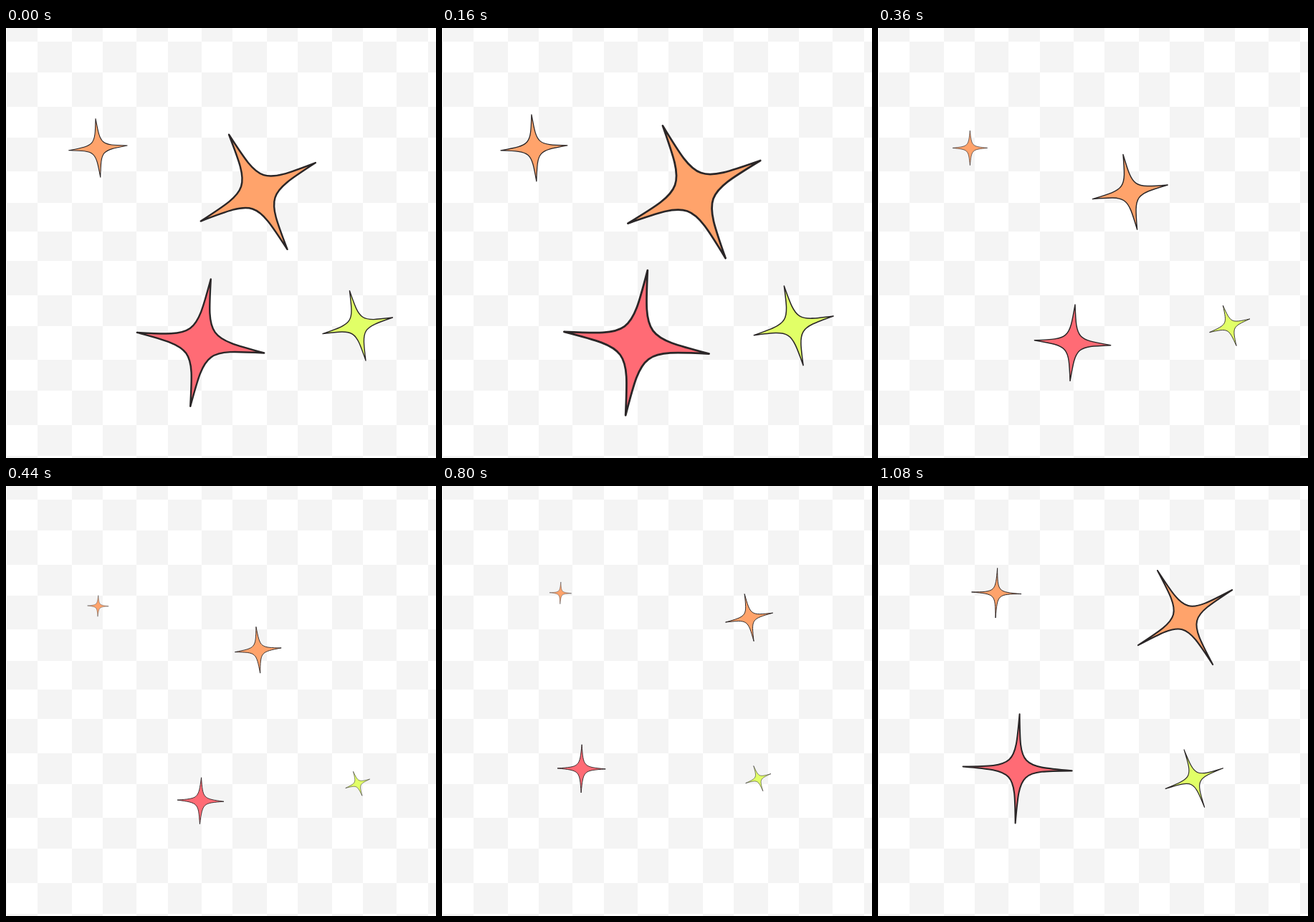
An HTML page with a canvas that plays this animation: 600x600 px, repeating every 1120 ms.

```html
<!DOCTYPE html>
<html lang="en">
<head>
<meta charset="utf-8">
<title>Twinkling stars</title>
<style>
html, body { margin: 0; width: 100%; height: 100%; overflow: hidden; background: #fff; }
canvas { display: block; }
</style>
</head>
<body>
<canvas id="stage" width="600" height="600"></canvas>
<script>
const ctx = document.getElementById('stage').getContext('2d');
const LOOP = 1120, STEP = 40;
const ORANGE = '#ffa36b', RED = '#ff6b75', LIME = '#e1ff67', INK = '#2a2627';
const cols = [0, 1, 44, 92, 135, 182, 226, 273, 316, 364, 407, 455, 498, 545, 589, 600];
const rows = [0, 19, 62, 110, 153, 200, 244, 284, 325, 373, 416, 463, 506, 554, 597, 600];

// x, y, relative size, resting angle, extra turn (degrees), fill
const shrinking = [
  [128.4, 167.4, 0.455, 2.6, -7.6, ORANGE],
  [351.8, 228.8, 1, -1.5, -26.4, ORANGE],
  [271.5, 439.2, 1, 0.7, 8.75, RED],
  [490.7, 415.3, 0.557, -21.4, 8.66, LIME]
];
const growing = [
  [165.3, 149.3, 0.457, 1.9, 0.3, ORANGE],
  [428.6, 183.6, 1, -2.9, -29, ORANGE],
  [194.6, 394.4, 1, 0.25, 2.1, RED],
  [441.3, 408.1, 0.56, -20.7, 1.2, LIME]
];

const clamp = u => Math.max(0, Math.min(1, u));
const sineEase = u => (1 - Math.cos(Math.PI * u)) / 2;

function drawBoard() {
  ctx.fillStyle = '#fff';
  ctx.fillRect(0, 0, 600, 600);
  ctx.fillStyle = '#f4f4f4';
  for (let r = 0; r < 15; r++)
    for (let c = (r + 1) % 2; c < 15; c += 2)
      ctx.fillRect(cols[c], rows[r], cols[c + 1] - cols[c], rows[r + 1] - rows[r]);
}

// pinch places the curve handles: smaller means slimmer arms
function drawStar([x, y, size, angle, turn, fill], radius, spin, pinch) {
  const r = radius * size * 0.987, k = r * pinch;
  ctx.save();
  ctx.translate(x, y);
  ctx.rotate((angle + turn * spin) * Math.PI / 180);
  ctx.beginPath();
  ctx.moveTo(0, -r);
  ctx.bezierCurveTo(k, -k, k, -k, r, 0);
  ctx.bezierCurveTo(k, k, k, k, 0, r);
  ctx.bezierCurveTo(-k, k, -k, k, -r, 0);
  ctx.bezierCurveTo(-k, -k, -k, -k, 0, -r);
  ctx.closePath();
  ctx.fillStyle = fill;
  ctx.fill();
  ctx.strokeStyle = INK;
  ctx.lineWidth = r * 0.027;
  ctx.lineJoin = 'round';
  ctx.stroke();
  ctx.restore();
}

function draw(t) {
  drawBoard();
  if (t < 560) {
    const left = 560 - t;
    const radius = t < 80 ? 91 + 0.39 * t : 0.2807 * left - 5.4e-5 * left * left;
    const spin = 1 - sineEase((t - 60) / 500);
    shrinking.forEach(s => drawStar(s, radius, spin, 0.095));
  } else if (t >= 640) {
    const grown = sineEase(clamp((t - 600) / 380) ** 1.2);
    const spin = sineEase((t - 600) / 560);
    growing.forEach(s => drawStar(s, 77.1 * grown, spin, 0.1 - 0.055 * grown));
  }
}

function tick() {
  const t = performance.now() % LOOP;
  draw(Math.floor(t / STEP) * STEP);
  requestAnimationFrame(tick);
}
tick();
</script>
</body>
</html>
```
